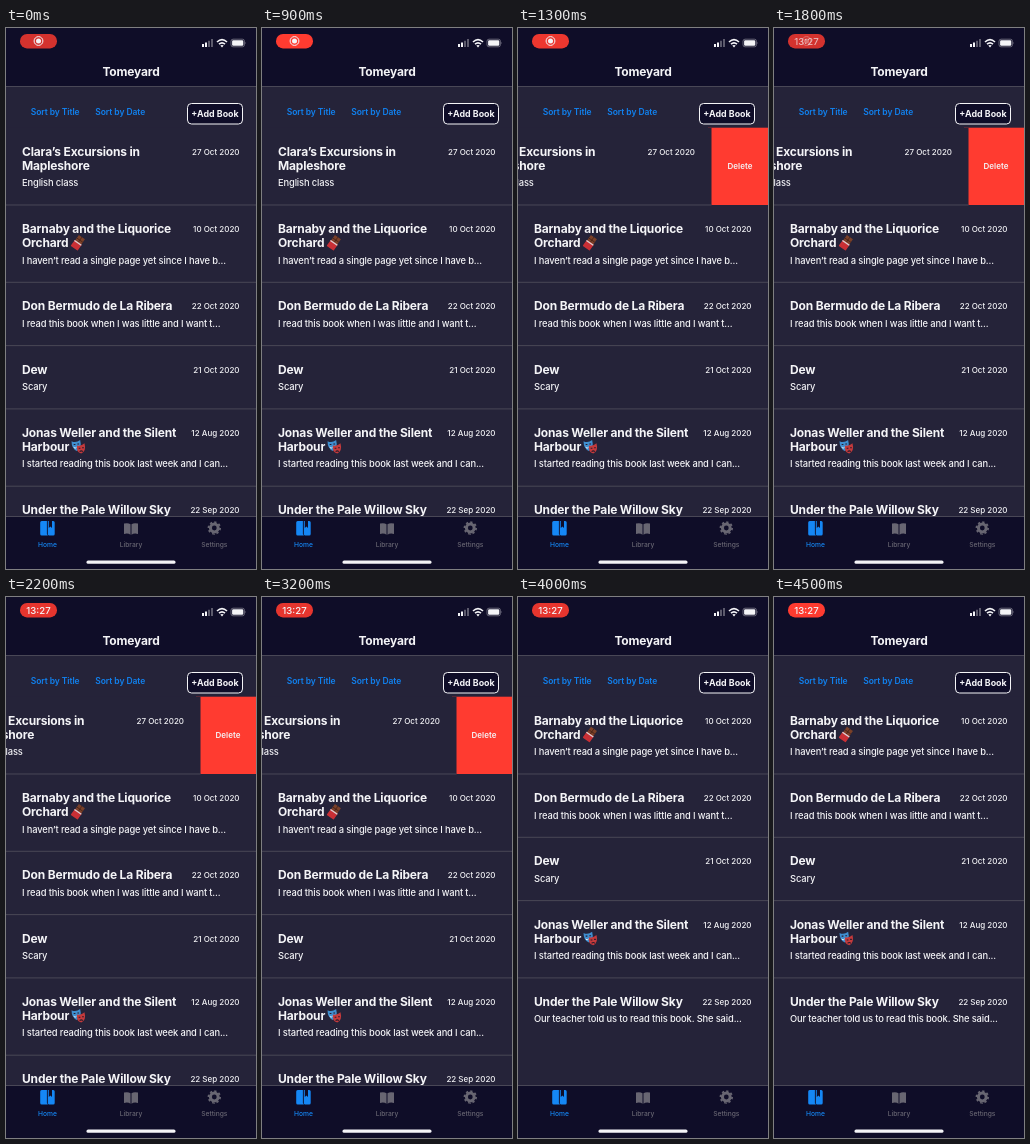
Recreate the animation shown at these times as an HTML page. Size 250 px wide and 541 px high, loop 4.6 s.

```html
<!DOCTYPE html>
<html lang="en">
<head>
<meta charset="utf-8">
<style>
  html, body { margin: 0; width: 100%; height: 100%; overflow: hidden; background: #252339; }
  svg { display: block; width: 250px; height: 541px; font-family: Inter, Roboto, sans-serif; fill: #f4f4f7; }
  .title { font-size: 12px; font-weight: 700; letter-spacing: -.17px; }
  .note { font-size: 9.33px; font-weight: 500; letter-spacing: -.13px; }
  .date { font-size: 8px; font-weight: 500; text-anchor: end; }
  .sort { font-size: 8.5px; font-weight: 600; letter-spacing: -.07px; fill: #1180ee; }
  .add { font-size: 8.9px; font-weight: 700; }
  .tab { font-size: 6.7px; font-weight: 500; }
  .mid { text-anchor: middle; }
  .rule { stroke: #494756; }
  .off { fill: #686672; }
  .on { fill: #1587f5; }
</style>
</head>
<body>
<svg viewBox="0 0 250 541">
  <defs>
    <g id="bar" transform="rotate(35) scale(1.05)">
      <rect x="-3.5" y="-6.5" width="7" height="7" fill="#7a4028"/>
      <path d="M-3.5-3H3.5M0-6.5V0" stroke="#4b2418" stroke-width=".8"/>
      <rect x="-4" y="-.5" width="8" height="7" rx=".6" fill="#c92f35"/>
      <path d="M-4 .2H4" stroke="#d9d4d6" stroke-width="1.2"/>
    </g>
    <g id="masks" transform="scale(1.08)">
      <path d="M-6-5Q-2-3 2-6Q4 2-1 4Q-6 2-6-5Z" fill="#3f8fd0"/>
      <path d="M-1-1Q3 0 6-3Q8 4 3 6.5Q-2 5-1-1Z" fill="#c43a3c"/>
      <path d="M-4-2h1.6M-.6-2.4H1M.6 1.5h1.6M3.8 1H5.4M1.5 4.6q1.6-1.4 3 0" fill="none" stroke="#2b1b2c"/>
      <path d="M-4 .6Q-2.6 2.4-1.4.6" fill="none" stroke="#fff" stroke-width=".8"/>
    </g>
  </defs>

  <rect width="250" height="541" fill="#252339"/>
  <g id="delete">
    <rect x="190" y="99.7" width="60" height="77.3" fill="#ff3b30"/>
    <text class="mid" x="222" y="141" font-size="8" font-weight="600">Delete</text>
  </g>
  <g id="list"></g>

  <rect width="250" height="58.5" fill="#0f0d28"/>
  <path class="rule" d="M0 58.5H250"/>
  <text class="title mid" x="125" y="48">Tomeyard</text>

  <rect id="pill" x="14" y="6" width="37" height="14.4" rx="7" fill="#ff3b30"/>
  <g id="rec">
    <circle cx="32.5" cy="13" r="4.4" fill="none" stroke="#f4f4f7" stroke-width="1"/>
    <circle cx="32.5" cy="13" r="2.5"/>
  </g>
  <text id="clock" class="mid" x="32.5" y="16.5" font-size="9.6" font-weight="500">13:27</text>

  <path d="M196 16h2v3h-2zM199 14.5h2v4.5h-2z"/>
  <path d="M202 12.8h2v6.2h-2zM205 11h2v8h-2z" fill="#5c5a6c"/>
  <path d="M211 14Q216 9.3 221 14M213 16.2Q216 13.4 219 16.2" fill="none" stroke="#f4f4f7" stroke-width="1.6"/>
  <path d="M214.3 17.6Q216 16.2 217.7 17.6L216 19.4Z"/>
  <rect x="225" y="11.2" width="13.4" height="7.6" rx="2" fill="none" stroke="#8c8a98" stroke-width=".7"/>
  <rect x="226.1" y="12.3" width="11.2" height="5.4" rx="1.2"/>
  <path d="M239.2 13.7q1 1.3 0 2.6z" fill="#8c8a98"/>

  <text class="sort" x="24.7" y="87">Sort by Title</text>
  <text class="sort" x="89.3" y="87">Sort by Date</text>
  <rect x="181.5" y="75.5" width="55" height="20.5" rx="4" fill="#0f0d28" stroke="#f4f4f7"/>
  <text class="add mid" x="209" y="89">+Add Book</text>

  <rect y="488.5" width="250" height="53" fill="#0f0d28"/>
  <path class="rule" d="M0 488.5H250"/>
  <g class="on">
    <path d="M34.2 494.5q0-1.5 1.5-1.5h5.2v13l1 1.5H35.7q-1.5 0-1.5-1.5z"/>
    <path d="M41.8 493h1v7l1.6-1.4L46 500v-7h1.2q1.5 0 1.5 1.5V506q0 1.5-1.5 1.5h-4.4l-1-1z"/>
    <text class="tab mid" x="41.5" y="519.3">Home</text>
  </g>
  <g class="off">
    <path d="M118 495.6Q122 494.4 124.5 496.3V506.8Q122 504.9 118 506Z"/>
    <path d="M132 495.6Q128 494.4 125.5 496.3V506.8Q128 504.9 132 506Z"/>
    <text class="tab mid" x="125" y="519.3">Library</text>
  </g>
  <g class="off">
    <circle cx="208.3" cy="500" r="3.9" fill="none" stroke="#686672" stroke-width="3"/>
    <circle cx="208.3" cy="500" r="5.8" fill="none" stroke="#686672" stroke-width="1.8" pathLength="16" stroke-dasharray="1"/>
    <text class="tab mid" x="208.3" y="519.3">Settings</text>
  </g>
  <rect x="80.5" y="532.5" width="89" height="3.3" rx="1.6"/>
</svg>

<script>
const books = [
  { title: ["Clara’s Excursions in", "Mapleshore"], date: "27 Oct 2020", note: "English class" },
  { title: ["Barnaby and the Liquorice", "Orchard"], date: "10 Oct 2020", note: "I haven’t read a single page yet since I have b...", icon: "bar" },
  { title: ["Don Bermudo de La Ribera"], date: "22 Oct 2020", note: "I read this book when I was little and I want t..." },
  { title: ["Dew"], date: "21 Oct 2020", note: "Scary" },
  { title: ["Jonas Weller and the Silent", "Harbour"], date: "12 Aug 2020", note: "I started reading this book last week and I can...", icon: "masks" },
  { title: ["Under the Pale Willow Sky"], date: "22 Sep 2020", note: "Our teacher told us to read this book. She said..." },
];
const LOOP = 4600, STEP = 100, TOP = 99.7, DELETED = 3300, PULSE = 1800;
const $ = id => document.getElementById(id);
const clamp = v => Math.min(1, Math.max(0, v));
const smooth = v => v * v * (3 - 2 * v);
const heightOf = book => book.title.length > 1 ? 77.3 : 63.3;

function rowMarkup(book, i) {
  const h = heightOf(book);
  const lines = book.title.map((s, n) => `<text class="title" x="16" y="${28 + n * 14}">${s}</text>`).join("");
  const icon = book.icon ? `<use href="#${book.icon}" x="72" y="37.7"/>` : "";
  const rule = i < books.length - 1 ? `<path class="rule" d="M0 ${h}H250"/>` : "";
  return `<g><rect width="250" height="${h}" fill="#252339"/>${lines}${icon}
    <text class="date" x="233.5" y="27">${book.date}</text>
    <text class="note" x="16" y="${h - 18.7}">${book.note}</text>${rule}</g>`;
}
// Later rows sit underneath so that each row keeps its bottom rule.
$("list").innerHTML = books.map(rowMarkup).reverse().join("");
const rows = [...$("list").children].reverse();

// Drag open, overshoot a little, then settle.
const swipe = t => t < 1400 ? -56.5 * smooth(clamp((t - 900) / 400)) : -55.5;

function draw(now) {
  const t = Math.floor(now % LOOP / STEP) * STEP;
  const deleted = t >= DELETED;
  $("delete").style.display = deleted || t < 1000 ? "none" : "";
  rows[0].style.display = deleted ? "none" : "";
  let y = TOP;
  rows.forEach((row, i) => {
    if (i === 0 && deleted) return;
    row.setAttribute("transform", `translate(${i ? 0 : swipe(t)} ${y})`);
    y += heightOf(books[i]);
  });
  const fade = clamp((t - 1600) / 300);
  $("rec").setAttribute("opacity", 1 - fade);
  $("clock").setAttribute("opacity", fade);
  $("pill").setAttribute("opacity", .91 - .09 * Math.cos(2 * Math.PI * t / PULSE));
}

const start = performance.now();
function tick() {
  draw(performance.now() - start);
  requestAnimationFrame(tick);
}
tick();
</script>
</body>
</html>
```
